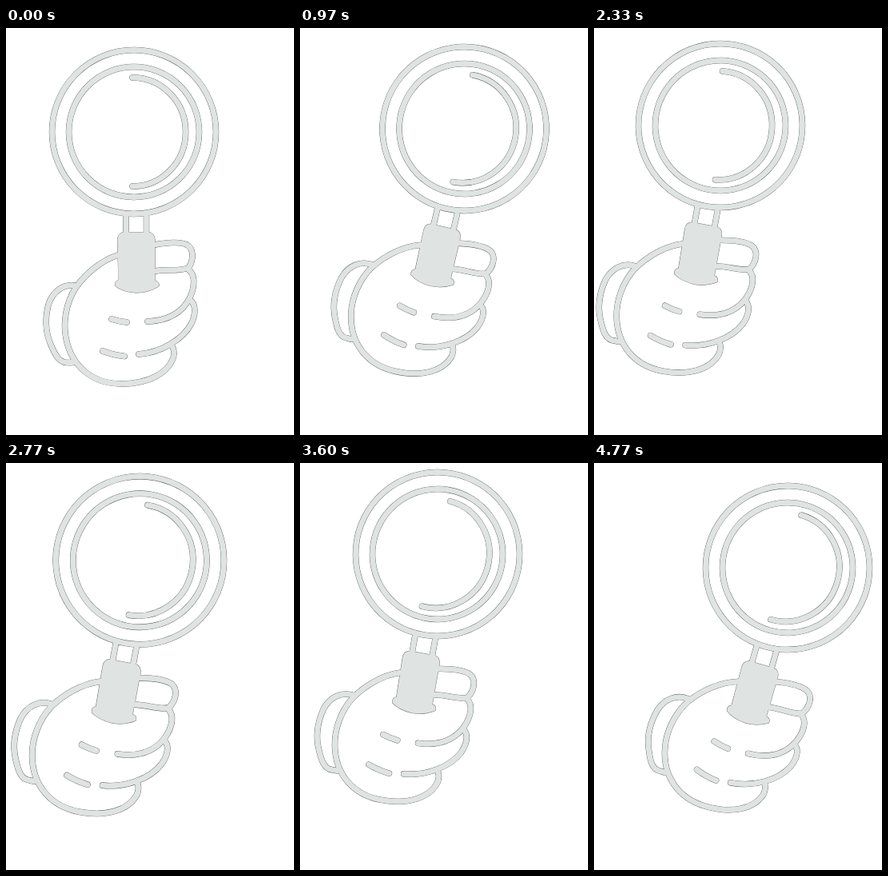
Animation of 360 by 509 pixels, one loop 5130 ms. Source, as an HTML page:

```html
<!DOCTYPE html>
<html lang="en">
<head>
<meta charset="utf-8">
<title>Magnifying glass</title>
<style>
  html, body { margin: 0; width: 100%; height: 100%; overflow: hidden; background: #fff; }
  svg { display: block; width: 360px; height: 509px; }
  .ink { fill: none; stroke-linecap: round; stroke-linejoin: round; }
  .edge { stroke: #4a4a4a; stroke-width: 7.4; --rim: 1; }
  .line { stroke: #dfe3e1; stroke-width: 6.8; --rim: .4; }
  .grip { fill: #dfe3e1; stroke-width: var(--rim); }
</style>
</head>
<body>
<svg viewBox="0 0 360 509">
  <defs>
    <g id="glass">
      <circle r="102.5"/>
      <circle r="81.5"/>
      <path d="M-10 106V126M15.5 106V126"/>
    </g>
    <path id="shine" d="M-2 -68A66.6 68 0 0 1 -2 68"/>
    <g id="hand" transform="translate(-160 -130)">
      <!-- palm and thumb -->
      <path d="M140 284C118 291 99 308 87 325C75 344 71 368 75 388C82 424 109 445 144 445C178 445 203 432 209.500 411Q211 402 207 397"/>
      <path d="M86 322C71 320 58 330 53 346C49 362 49 380 56 396C62 410 67 419 77 418.500H83"/>
      <!-- fingers -->
      <path d="M186 271C202 268 217 267 226 271C235 276 235 290 228 300C217 305 202 301 186 304"/>
      <path d="M228 302C236 308 237 321 230 337C221 355 204 366 177 367"/>
      <path d="M230 340C238 346 237 358 232 369C222 389 194 406 166 408"/>
      <!-- creases -->
      <path d="M132 364Q141 367 151 368M121 404Q134 409 148 410.500"/>
      <path class="grip" d="M139.500 265Q139.500 256 148 255.500H178Q185.500 256 186 265V316Q192 317 191 323Q178 331 163 331Q146 330 137 323Q135 317 140.500 315Z"/>
    </g>
  </defs>
  <g id="pose">
    <g class="ink edge"><use href="#glass"/><use href="#hand"/><use href="#shine" class="arc"/></g>
    <g class="ink line"><use href="#glass"/><use href="#hand"/><use href="#shine" class="arc"/></g>
  </g>
</svg>
<script>
const LOOP = 5130, TICK = 100 / 3;

const inOut = u => u < .5 ? 2 * u * u : 1 - 2 * (1 - u) ** 2;
const out = u => 1 - (1 - u) ** 2.2;

// Lens x, lens y, scale, tilt, shine angle
const upright = [160, 130, 1, 0, 0];
const right = [242, 131, 1, 16.1, 16.3];
const left = [158, 122, 1, 10.3, 3.8];
const leftNear = [156.7, 111, 1.05, 8.6, 2];
const middle = [209, 130, 1.05, 12.9, 31];
const back = [172, 114, 1, 10, 15];
const windUp = [158, 129.5, 1.013, 0, 0];
const windRight = [253, 130, 1, 16.1, 17];
const lift = [166, 121.5, 1.025, 10.6, 9];

// Start tick, end tick, pose reached, easing
const moves = [
  [0, 0, upright, inOut],
  [1, 4, windUp, inOut], [4, 12, right, inOut],
  [22, 25, windRight, inOut], [25, 33, left, inOut],
  [41, 52, leftNear, out],
  [62, 70, left, inOut],
  [79, 82, lift, inOut], [82, 90, middle, inOut],
  [100, 108, back, inOut],
  [119, 130, upright, inOut],
  [131, 134, windUp, inOut], [134, 143, right, inOut]
];

function poseAt(tick) {
  let from = upright;
  for (const [start, end, to, ease] of moves) {
    if (tick <= start) break;
    if (tick < end) {
      const p = ease((tick - start) / (end - start));
      return from.map((v, i) => v + (to[i] - v) * p);
    }
    from = to;
  }
  return from;
}

const pose = document.getElementById('pose');
const arcs = document.querySelectorAll('.arc');
const begin = performance.now();

function draw() {
  const t = (performance.now() - begin) % LOOP;
  const [x, y, s, tilt, shine] = poseAt(Math.floor((t + 4) / TICK));
  pose.setAttribute('transform', `translate(${x} ${y}) rotate(${tilt}) scale(${s})`);
  arcs.forEach(a => a.setAttribute('transform', `rotate(${shine - tilt})`));
  requestAnimationFrame(draw);
}
draw();
</script>
</body>
</html>
```
